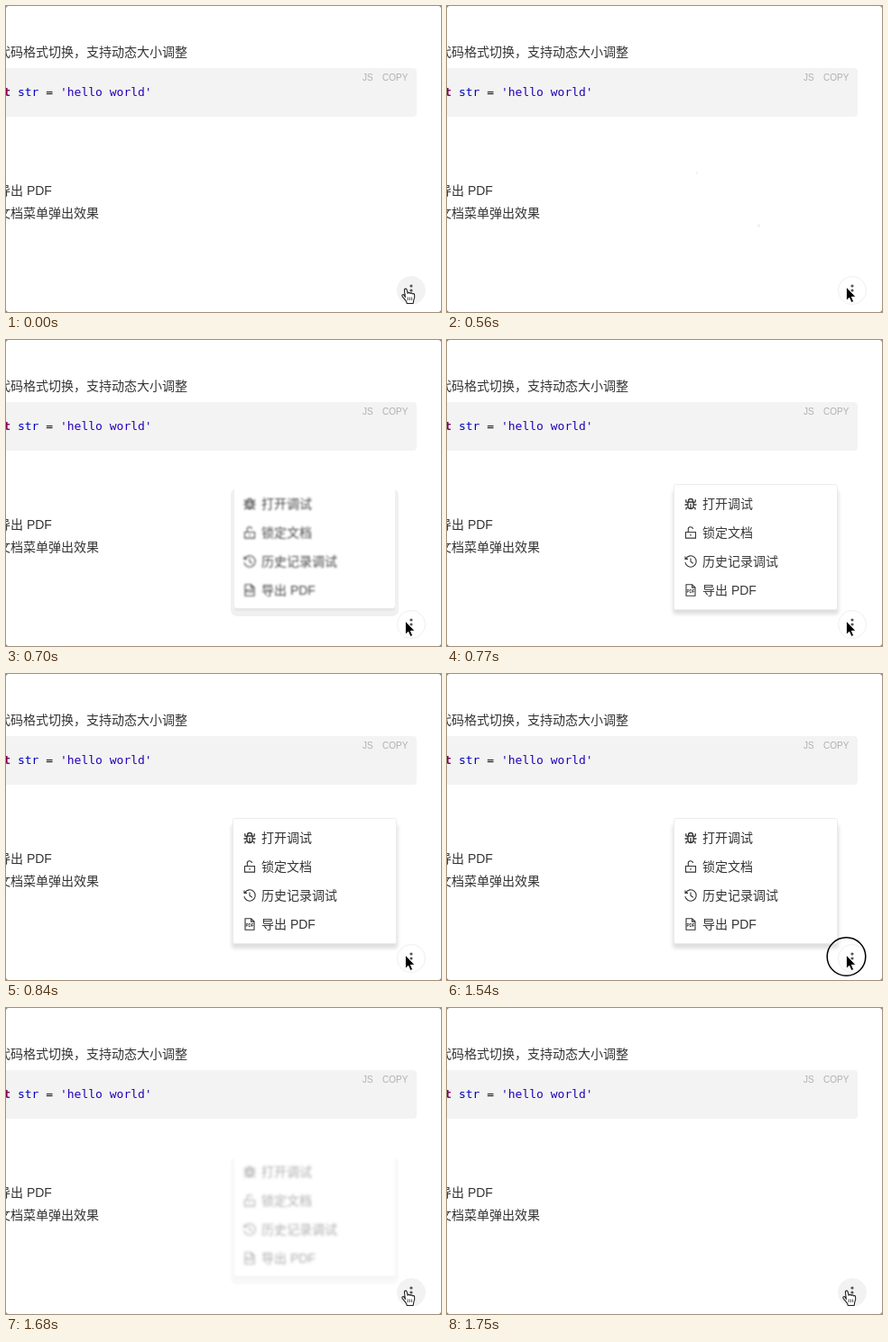
Animation of 482 by 340 pixels, one loop 2310 ms. Source, as an HTML page:

```html
<!DOCTYPE html>
<html lang="zh-CN">
<head>
<meta charset="utf-8">
<title>Document menu</title>
<style>
  html, body { margin: 0; width: 100%; height: 100%; overflow: hidden; background: #777; }
  svg { display: block; width: 482px; height: 340px; }
  text { font: 14px "Liberation Sans", "Noto Sans CJK SC", "Noto Sans CJK", sans-serif; fill: #333; white-space: pre; }
  .code text { font: 13px "DejaVu Sans Mono", monospace; fill: #111; }
  .code .keyword { font-weight: bold; fill: #7f0055; }
  .code .name { fill: #0000c0; }
  .code .string { fill: #2500b8; }
  .code .tool { font: 10px "Liberation Sans", sans-serif; fill: #b0b0b0; }
  .icon { fill: none; stroke: #333; stroke-width: 1.1; }
  .icon text { font: bold 4.6px "Liberation Sans", sans-serif; stroke: none; text-anchor: middle; }
</style>
</head>
<body>
<svg viewBox="0 0 482 340">
  <rect width="482" height="340" rx="3" fill="#fff"/>

  <text x="-9" y="56">代码格式切换，支持动态大小调整</text>
  <text x="-9" y="210.4">导出 PDF</text>
  <text x="-9" y="235.4">文档菜单弹出效果</text>

  <g class="code">
    <rect x="-10" y="69" width="465" height="54" rx="4" fill="#f3f3f3"/>
    <text x="-34" y="100.4"><tspan class="keyword">const</tspan> <tspan class="name">str</tspan> = <tspan class="string">'hello world'</tspan></text>
    <text class="tool" x="395" y="82.5">JS</text>
    <text class="tool" x="417" y="82.5">COPY</text>
  </g>

  <g id="specks" fill="#f0f0f0">
    <circle cx="277" cy="185.5" r="1.2"/>
    <circle cx="345.5" cy="244" r="1.7"/>
  </g>

  <g id="menu">
    <g id="halo">
      <rect x="249" y="165" width="186" height="142" rx="7" fill="#efefef"/>
      <rect x="253" y="290" width="178" height="11" rx="3" fill="#e5e5e5"/>
      <rect x="253" y="158" width="178" height="140" rx="3" fill="#fff"/>
    </g>
    <g id="panel">
      <rect x="250" y="167" width="184" height="138" rx="3" fill="#000" opacity=".13" style="filter: blur(2px)"/>
      <rect x="251.5" y="160.5" width="181" height="139" rx="2" fill="#fff" stroke="#ececec"/>
    </g>
    <g id="items">
      <g class="icon" transform="translate(263 175)">
        <path stroke-width="1.3" d="M4 5h6v4.5a3 3 0 0 1-6 0zM4.5 5V4a2.5 2.5 0 0 1 5 0v1M7 7v5M4 8H.5M10 8h3.5M4 6 1.8 4.8V2.2M10 6l2.2-1.2V2.2M4.3 10.5 2 11.8v1.8M9.7 10.5l2.3 1.3v1.8"/>
      </g>
      <g class="icon" transform="translate(263 207)">
        <path d="M1.5 6.5h11v6.6h-11zM4.3 6.5V3.6a2.6 2.6 0 0 1 5.2-.6M7 8.8v2"/>
      </g>
      <g class="icon" transform="translate(263 239)">
        <path d="M1.5 4.2A6.2 6.2 0 1 1 .9 8M1 1.4v3h3M7 3.5v3.7l2.8 2"/>
      </g>
      <g class="icon" transform="translate(263 271)">
        <path d="M8.6.7H2v12.6h10V4.1zM8.6.7v3.4H12"/>
        <text x="7" y="10.3">PDF</text>
      </g>
      <text x="283" y="187.3">打开调试</text>
      <text x="283" y="219.3">锁定文档</text>
      <text x="283" y="251.3">历史记录调试</text>
      <text x="283" y="283">导出 PDF</text>
    </g>
  </g>

  <circle id="button" cx="449" cy="316" r="15.5"/>
  <g fill="#555">
    <circle cx="449" cy="311" r="1.6"/>
    <circle cx="449" cy="316" r="1.6"/>
    <circle cx="449" cy="321" r="1.6"/>
  </g>

  <circle id="ring" cx="442.5" cy="314" r="21.3" fill="none" stroke="#000" stroke-width="1.5"/>
  <path id="arrow" d="M442.4 312v15.4l3.3-3.1 2.3 5.2 2.7-1.1-2.3-5.1h4.6z" fill="#000" stroke="#fff" stroke-width="1"/>
  <g id="hand" stroke="#222" stroke-width="1.1" stroke-linejoin="round">
    <path fill="#fff" d="M442.4 323.5 441.4 315.8c-.2-2 2.4-2.4 2.8-.4l.9 3.9c.3-1.3 2.4-1.2 2.7.2.5-1 2.3-.8 2.5.5.6-.8 2.1-.5 2.3.8.5 2.8.2 4.3-.9 6.3l-.5 3.4h-7l-.4-2c-1.6-2-2.9-3.8-4.7-5.9-.9-1.3.7-2.6 1.9-1.6z"/>
    <path fill="none" stroke-width=".8" d="M445.2 323.5v3.5M447.4 323.5v3.5M449.6 323.5v3.5"/>
  </g>
</svg>
<script>
  const LOOP = 2310;
  // blur is in px; extra names the one-step overlay
  const steps = [
    { at: 0, cursor: "hand", opacity: 0, blur: 0 },
    { at: 560, cursor: "arrow", opacity: 0, blur: 0, extra: "specks" },
    { at: 630, cursor: "arrow", opacity: .4, blur: 1.8 },
    { at: 700, cursor: "arrow", opacity: .9, blur: .9 },
    { at: 770, cursor: "arrow", opacity: .97, blur: .4 },
    { at: 840, cursor: "arrow", opacity: 1, blur: 0 },
    { at: 1540, cursor: "arrow", opacity: 1, blur: 0, extra: "ring" },
    { at: 1610, cursor: "hand", opacity: .9, blur: .9 },
    { at: 1680, cursor: "hand", opacity: .4, blur: 1.8 },
    { at: 1750, cursor: "hand", opacity: 0, blur: 0 }
  ];

  const get = id => document.getElementById(id);
  const toggle = (id, on) => { get(id).style.display = on ? "" : "none"; };
  let current;

  function show(step) {
    const hover = step.cursor === "hand";
    const soft = step.blur > .6;
    toggle("hand", hover);
    toggle("arrow", !hover);
    toggle("specks", step.extra === "specks");
    toggle("ring", step.extra === "ring");
    toggle("menu", step.opacity > 0);
    toggle("halo", soft);
    toggle("panel", !soft);
    get("menu").style.opacity = step.opacity;
    get("items").style.filter = step.blur ? `blur(${step.blur}px)` : "none";
    get("halo").style.filter = `blur(${step.blur * .7}px)`;
    get("button").setAttribute("fill", hover ? "#f2f2f2" : "#fff");
    get("button").setAttribute("stroke", hover ? "#f2f2f2" : "#efefef");
  }

  function tick() {
    const time = performance.now() % LOOP;
    const step = steps.filter(s => s.at <= time).pop();
    if (step !== current) show(current = step);
    requestAnimationFrame(tick);
  }
  tick();
</script>
</body>
</html>
```
